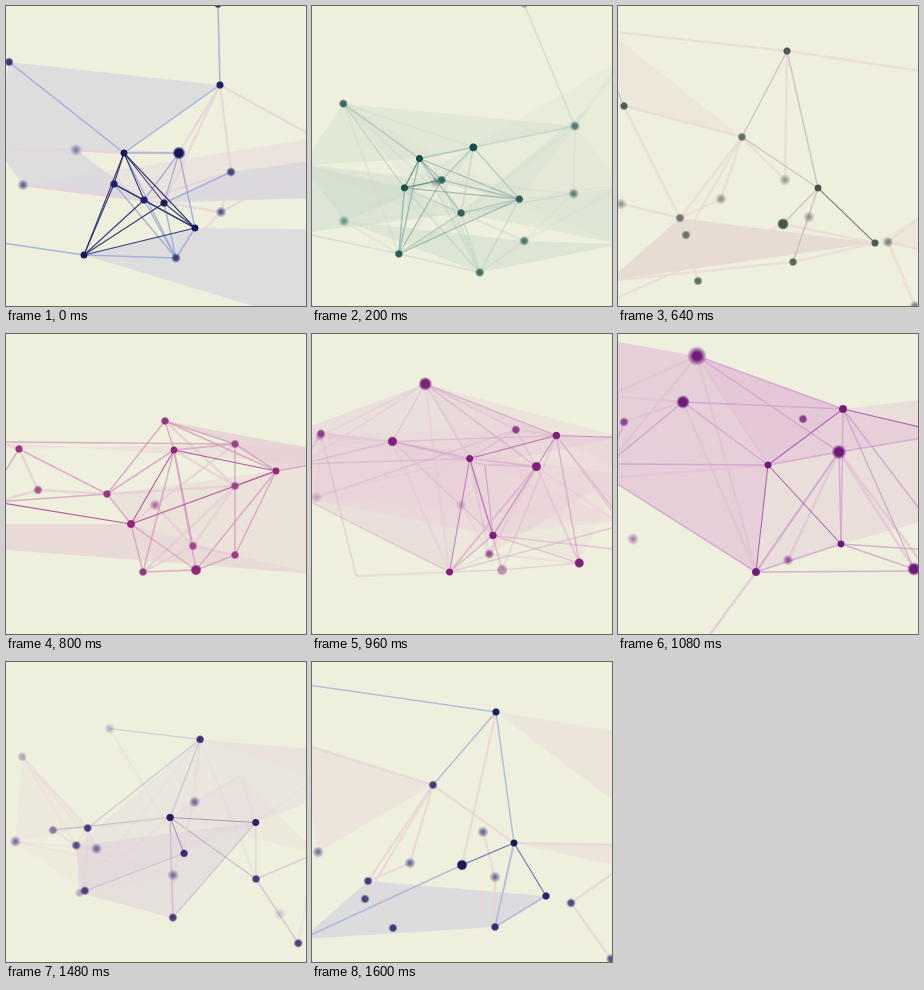
Write an HTML page with a canvas that moves like this. It is 300x300 px and loops after 1.64 s.

```html
<!DOCTYPE html>
<html lang="en">
<head>
<meta charset="utf-8">
<title>Plexus</title>
<style>
html, body { margin: 0; width: 100%; height: 100%; overflow: hidden; background: #eeefdd; }
canvas { display: block; }
</style>
</head>
<body>
<canvas id="stage" width="300" height="300"></canvas>
<script>
const ctx = document.getElementById('stage').getContext('2d');
const LOOP = 1640, STEP = 40;
const scenes = [];

// Nodes are A: [x, y, focus]; focus > 0 is far, < 0 is near, absent means a hidden anchor.
// Links (sharp, mid, soft) and faces (solid, haze) are written as node letters.
function scene(time, colours, nodes, links, faces) {
  const rgb = hex => [1, 3, 5].map(i => parseInt(hex.slice(i, i + 2), 16));
  const split = list => list.map(s => s.split(' ').filter(Boolean));
  scenes.push({ time, colours: colours.split(' ').map(rgb), nodes, links: split(links), faces: split(faces) });
}

// colours: dot, sharp link, mid link, face, haze
scene(0, '#17145a #22296c #92a2d6 #d3d3df #e6d3da', {
  A: [118, 147, 0], B: [173, 147, -.45], C: [108, 178, .15], D: [138, 194, .15], E: [158, 197, .1],
  F: [189, 222, 0], G: [78, 249, 0], H: [170, 252, .4], I: [225, 166, .4], J: [215, 206, .6],
  K: [214, 79, .1], L: [212, -2, .2], M: [3, 56, .3], N: [70, 144, .9], O: [17, 179, .7],
  P: [-10, 142], Q: [310, 319], R: [310, 154], S: [310, 192], T: [-10, 236], U: [310, 223], V: [310, 132]
}, ['AC AD AE AF AG CG CF DG DF EG EF FG CD', 'AB KA KL MA BF BE AH GT FH GH DH CH EH IE BD',
  'KI KE KB KV NA NC PN NB OD OE IJ JR HJ EJ ID'],
['MKAP GFUQ PNDO EIRS', 'ODSV']);

scene(360, '#16823a #3fa75c #9fd0a8 #a6d3ad #c6dfc3', {
  A: [99, 157, 0], B: [152, 137, .2], C: [80, 185, -.1], D: [123, 158, .3], E: [142, 215, .25],
  F: [222, 170, .3], G: [94, 247, .25], H: [166, 278, .3], I: [291, 205, .8], J: [210, 258, .35],
  K: [302, 153, .8], M: [54, 131, .25], N: [168, 201, .9], O: [44, 244, .8],
  P: [-10, 173], Q: [-10, 140], R: [310, 200], S: [310, 275], T: [-10, 220], U: [258, -2],
  V: [310, -10], W: [310, 62], X: [-10, 157], Y: [310, 178]
}, ['AC CD', 'MC MA AB AG CG CE AE DB DF BF',
  'MB BE BG DE HN HE NF EF EJ IF OG HJ GE NI BC MG ME PC'],
['PCET FYR OJSH', 'QMFKYFDX CFIRE UVW']);

scene(640, '#45574c #807a7c #c5b9bd #e2d1ce #eadad5', {
  A: [200, 182, 0], B: [169, 45, .05], C: [62, 212, .35], D: [103, 193, .75], E: [191, 211, .8],
  F: [257, 237, .05], G: [68, 229, .35], H: [175, 256, .2], I: [270, 236, .6], J: [297, 300, .6],
  K: [167, 174, .8], L: [165, 218, -.35], M: [6, 100, .1], N: [124, 131, .3], O: [3, 198, .8],
  P: [80, 275, .3], Q: [-10, 275], R: [-10, 25], S: [310, 66], T: [310, 245], U: [310, 205], V: [-10, 296], W: [-10, 62]
}, ['AF', 'BA AL AH BN NA WM', 'RB BS MN MC NC ND NG CD HE HF OC CP IU IT BK FL VL NK CG HQ IJ'],
['QCF', 'RNM FTU']);

scene(800, '#902879 #b24a97 #d498bf #e4c6d4 #e6cdd3', {
  A: [168, 116, 0], B: [159, 87, .15], C: [101, 160, .15], D: [149, 171, .7], E: [187, 212, .3],
  F: [270, 137, 0], G: [137, 238, .15], H: [190, 236, -.3], I: [229, 152, .3], J: [229, 221, .2],
  K: [229, 110, .25], L: [125, 190, -.1], M: [13, 115, .15], N: [-10, 108], O: [32, 156, .4],
  P: [-10, 190], Q: [-10, 215], R: [310, 115], S: [310, 240], T: [310, 130], U: [-10, 168], V: [-10, 152]
}, ['AL AF LF UL', 'CL CA BA BC BK BF KA KF UC LG LH AE AH FI FJ FH GH JH IJ KI MC MV NK TF GA',
  'MN MO OU OC DL DK GE BI DE IE IC JE GI AI'],
['BKFTR', 'NMKRT CFTSEL PLESQ PLJSQ']);

scene(1080, '#701a79 #a85aae #cf9dcc #e1bbd5 #e2c3d4', {
  A: [150, 131, 0], B: [79, 22, -1], C: [65, 68, -.5], E: [170, 226, .6], F: [225, 75, -.1],
  G: [138, 238, -.1], I: [221, 118, -.6], J: [296, 235, -.5], K: [185, 85, .3], L: [223, 210, 0],
  M: [6, 88, .4], N: [15, 205, .85], O: [-10, 62], P: [-10, 144], Q: [-10, 6], R: [310, 95],
  S: [310, 65], T: [310, 237], U: [310, 103], V: [85, 310], W: [310, 216], X: [-10, 130], Y: [310, 186]
}, ['AF AG FR AL', 'AI CA FB BI CF CX MX FL IU FJ GL LW GT LJ PG AX FY IL GI',
  'BO BX BA BG CO IG IE CG IT IJ PA VG MC'],
['QBFRUIAX XAGP', 'AILG IUYL FSR BFA']);

scene(1280, '#541570 #9a4bab #cda0d0 #e1bad5 #e8cfda', {
  A: [101, 113, -.1], B: [211, 123, .4], C: [94, 124, .6], D: [78, 163, .7], E: [141, 210, .85],
  F: [276, 38, 0], G: [122, 215, .25], H: [140, 240, .4], I: [235, 177, 0], J: [281, 255, 0],
  K: [218, 90, .7], L: [225, 172, .9], M: [60, 116, .4], N: [16, 238, .15], O: [15, 162, .7],
  P: [-10, 5], Q: [213, 154, .4], R: [293, 141, .6], S: [310, 117], T: [310, 169], U: [110, -3],
  V: [310, 70], W: [310, 137], X: [274, 252, .9]
}, ['PA AI IT IJ', 'FI', 'UF FV KB BQ MC CD MD DO GH EH EG OE NG AQ JT LR BI CE'],
['CBSWQ', 'OGE']);

scene(1600, '#19195c #5a67a8 #a3add6 #d0d1df #e8d4d6', {
  A: [202, 181, 0], B: [184, 50, .05], C: [56, 219, .3], D: [98, 201, .7], E: [183, 215, .75],
  F: [234, 234, .1], G: [53, 237, .35], H: [183, 265, .2], I: [259, 241, .4], J: [299, 297, .5],
  K: [171, 170, .7], L: [150, 203, -.3], M: [-10, 82], N: [121, 123, .3], O: [6, 190, .75],
  P: [81, 266, .3], Q: [-10, 277], R: [-10, 22], S: [310, 70], T: [310, 205], U: [310, 183], V: [310, 145]
}, ['AL AF', 'BA BN AH HF RB QL', 'BL NA HA MN NC ND NG CD IT CP EK HE CG AU IJ'],
['QCFH', 'BSV AUT MNO']);

const mix = (a, b, u) => a + (b - a) * u;
const blend = (p, q, u) => p.map((v, i) => mix(v, q[i], u));
const rgba = (c, alpha) => `rgba(${c.map(Math.round)},${alpha})`;

function trace(path, points) {
  ctx.beginPath();
  for (const letter of path) ctx.lineTo(points[letter][0], points[letter][1]);
}

function drawFaces(s, points, colours, fade) {
  [[1, 4, .4], [0, 3, .6]].forEach(([group, colour, alpha]) => {
    ctx.fillStyle = rgba(colours[colour], alpha * fade);
    for (const path of s.faces[group]) { trace(path, points); ctx.fill(); }
  });
}

function drawLinks(s, points, colours, fade) {
  [[2, 4, .75, 2.4], [1, 2, .75, 1.5], [0, 1, .9, 1.1]].forEach(([group, colour, alpha, width]) => {
    ctx.strokeStyle = rgba(colours[colour], alpha * fade);
    ctx.lineWidth = width;
    for (const path of s.links[group]) { trace(path, points); ctx.stroke(); }
  });
}

function drawDot([x, y, focus], colours, fade) {
  const near = focus < 0, soft = Math.abs(focus);
  const radius = 3.9 + (near ? 6 : 2.6) * soft;
  const colour = near ? colours[0] : blend(colours[0], colours[2], .35 * focus);
  const alpha = fade * (near ? 1 : 1 - .4 * focus);
  const glow = ctx.createRadialGradient(x, y, 0, x, y, radius);
  glow.addColorStop(0, rgba(colour, alpha));
  glow.addColorStop(near ? .8 - .4 * soft : .8 * (1 - soft), rgba(colour, alpha));
  glow.addColorStop(1, rgba(colour, 0));
  ctx.fillStyle = glow;
  ctx.fillRect(x - radius, y - radius, 2 * radius, 2 * radius);
}

function draw(time) {
  const index = scenes.findLastIndex(s => s.time <= time);
  const from = scenes[index], to = scenes[(index + 1) % scenes.length];
  const u = (time - from.time) / ((to.time || LOOP) - from.time);
  const colours = from.colours.map((c, i) => blend(c, to.colours[i], u));
  const points = {};
  const parts = [[from, 1 - u], [to, u]].filter(([, fade]) => fade > 0);

  for (const letter in { ...from.nodes, ...to.nodes }) {
    const a = from.nodes[letter] || to.nodes[letter], b = to.nodes[letter] || a;
    points[letter] = [mix(a[0], b[0], u), mix(a[1], b[1], u), mix(a[2] ?? b[2], b[2] ?? a[2], u)];
  }
  ctx.fillStyle = '#eeefdd';
  ctx.fillRect(0, 0, 300, 300);
  for (const [s, fade] of parts) drawFaces(s, points, colours, fade);
  for (const [s, fade] of parts) drawLinks(s, points, colours, fade);
  for (const letter in points) {
    const shown = n => n && n.length > 2 ? 1 : 0;
    const fade = mix(shown(from.nodes[letter]), shown(to.nodes[letter]), u);
    if (fade > 0) drawDot(points[letter], colours, fade);
  }
}

const start = performance.now();
function tick() {
  const time = (performance.now() - start) % LOOP;
  draw(Math.floor(time / STEP) * STEP);
  requestAnimationFrame(tick);
}
tick();
</script>
</body>
</html>
```
